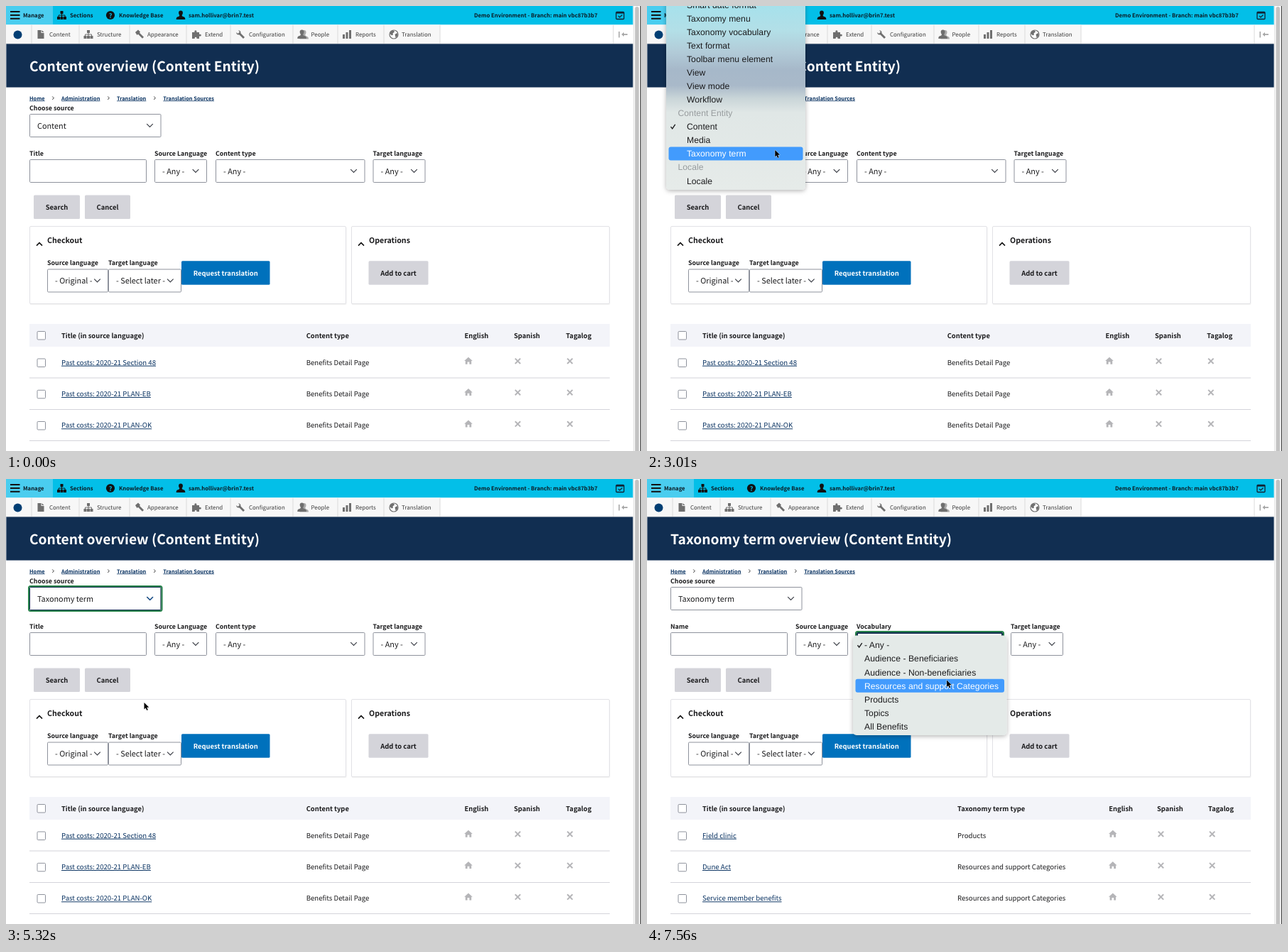
Write an HTML page that moves like this. It is 894 px wide and 627 px high and loops after 8000 ms.

```html
<!DOCTYPE html>
<html lang="en">
<head>
<meta charset="utf-8">
<title>Translation sources</title>
<style>
  html, body { margin: 0; width: 100%; height: 100%; overflow: hidden; background: #fff; }
  svg { display: block; width: 100%; height: 100%; }
  text { font-family: "Noto Sans CJK JP", "Noto Sans CJK SC", "Noto Sans CJK", "Open Sans", sans-serif;
         text-rendering: geometricPrecision; white-space: pre; text-decoration-thickness: 1px; }
  .menu text { font-family: "Liberation Sans", Arial, sans-serif; letter-spacing: .05px; }
</style>
</head>
<body>
<svg id="stage" viewBox="0 0 894 627" xmlns="http://www.w3.org/2000/svg"></svg>
<script>
const LOOP = 8000;
const NAVY = '#112e51', INK = '#1b1b1d', EDGE = '#8e929c', LINK = '#0a3362', GREY = '#d4d4da';

// ---- drawing helpers, each returns markup ----
const rect = (x, y, w, h, fill, more = '') =>
  `<rect x="${x}" y="${y}" width="${w}" height="${h}" fill="${fill}" ${more}/>`;
const path = (d, more) => `<path d="${d}" ${more}/>`;
const line = (d, color, w = 1) => path(d, `fill="none" stroke="${color}" stroke-width="${w}"`);
const solid = (d, color) => path(d, `fill="${color}"`);
const at = (x, y, s) => `<g transform="translate(${x} ${y})">${s}</g>`;
const text = (x, y, s, size, fill = INK, more = '') =>
  `<text x="${x}" y="${y}" font-size="${size}" fill="${fill}" ${more}>${s}</text>`;
const bold = (x, y, s, size, fill = INK, more = '') =>
  text(x, y, s, size, fill, 'font-weight="700" ' + more);
const link = (x, y, s, size, make = text) => make(x, y, s, size, LINK, 'text-decoration="underline"');
const label = (x, y, s) => bold(x, y, s, 8.83);
const chevron = (x, y, color = '#3c3f47') => line(`M${x - 4.3} ${y - 2.2}l4.3 4.3l4.3 -4.3`, color, 1.2);
const field = (x, y, w, h) => rect(x + .5, y + .5, w - 1, h - 1, '#fff', `rx="1.2" stroke="${EDGE}"`);
const select = (x, y, w, s, arrow) =>
  field(x, y, w, 33) + text(x + 11, y + 20.6, s, 10.85) + chevron(arrow || x + w - 16, y + 16.3);
const button = (x, y, w, s, fill = GREY, color = INK) =>
  rect(x, y, w, 33.5, fill, 'rx="1.5"') +
  bold(x + w / 2, y + 20.4, s, 9.42, color, 'text-anchor="middle"');
const group = (id, s, more = '') => `<g id="${id}" ${more}>${s}</g>`;

// ---- icons, centred on the origin ----
const tree = c => solid('M-2 -6h4v4h-4zM-6.5 2h4v4h-4zM-2 2h4v4h-4zM2.5 2h4v4h-4z', c) +
  line('M-4.5 2v-2h9v2M0 -2v4', c);
const person = c => solid('M0 -6.5c2.2 0 3.1 1.5 2.9 3.5c-.2 1.5 -.7 2.2 -1.2 2.9c0 1.4 1 1.8 2.6 2.4c1.5 .6 2 1.6 2 3.7h-12.6c0 -2.1 .5 -3.1 2 -3.7c1.6 -.6 2.6 -1 2.6 -2.4c-.5 -.7 -1 -1.4 -1.2 -2.9c-.2 -2 .7 -3.5 2.9 -3.5z', c);
const G = '#6f6f6f';
const icons = {
  page: solid('M-4.5 -6h5v4h4v8h-9z', G) + solid('M1.5 -6l3 3h-3z', G),
  tree: tree(G),
  tool: solid('M-6 -3l4 -3.5l3 3l-1 1.2l6 6l-2 2l-6 -6l-1.5 1.3z', G),
  puzzle: solid('M-6 -3h3.5c-1.2 -3.8 4 -3.8 2.8 0h3.7v3c3.8 -1.2 3.8 3.6 0 2.6v3.4h-3.6c.8 -3 -3.4 -3 -2.6 0h-3.8z', G),
  wrench: line('M-1.5 -1.5l6.5 6.5', G, 2.8) +
    path('M-4.8 -4.8a3 3 0 1 0 3.6 0v2.8h-3.6z', `fill="${G}" transform="rotate(-45 -3 -3)"`),
  people: at(1.6, .6, person('#aaa')) + at(-1.4, 0, person(G)),
  bars: solid('M-6.5 0h3v6h-3zM-2 -3h3v9h-3zM2.5 -6h3v12h-3z', G),
  globe: `<circle r="6" fill="#fff" stroke="${G}" stroke-width="1.2"/>` +
    solid('M-5.5 -1c1 -3.5 3 -4.5 5.5 -4.5l1 2l-2.5 2l.5 2l-2 1zM1.5 0l3 -2l1 2c0 2 -1.5 4 -3 4.5l-.5 -2.5z', G)
};

function header() {
  const tabs = [['Content', 49, 61, 'page'], ['Structure', 116, 128, 'tree'], ['Appearance', 188, 199, 'tool'],
    ['Extend', 268, 280, 'puzzle'], ['Configuration', 330, 342, 'wrench'], ['People', 418, 429.5, 'people'],
    ['Reports', 480.5, 492, 'bars'], ['Translation', 546, 557, 'globe']];
  const edges = [36, 103, 174, 254, 316, 404, 467, 532, 611, 855];
  const top = (x, s) => bold(x, 16.3, s, 7.72, '#0c1b24');
  return rect(0, 0, 882.6, 26.5, '#03bfe8') + rect(0, 0, 66, 26.5, '#4acdef') +
    [7, 11.9, 16.8].map(y => rect(6, y, 13.5, 2, '#111')).join('') +
    top(24, 'Manage') + at(78.5, 13, tree('#111')) + top(90, 'Sections') +
    '<circle cx="147" cy="13" r="6.1" fill="#111"/>' +
    bold(147, 16.5, '?', 9, '#03bfe8', 'text-anchor="middle"') + top(159, 'Knowledge Base') +
    at(246, 13, person('#111')) + top(257, 'sam.hollivar@brin7.test') +
    top(659, 'Demo Environment - Branch: main vbc87b3b7') +
    rect(859, 8.5, 11, 10, 'none', 'rx="1" stroke="#123" stroke-width="1.3"') +
    rect(859, 8, 11, 2.6, '#123') + line('M862 14l2 2l3.5 -3.5', '#123', 1.2) +
    rect(0, 26.5, 882.6, 27, '#fff') + rect(0, 26.5, 611, 27, '#f7f7f7') + rect(0, 52.6, 882.6, 1, '#ddd') +
    edges.map(x => rect(x - .5, 26.5, 1, 27, '#dcdcdc')).join('') +
    `<circle cx="16.5" cy="40.5" r="6" fill="#003e73"/>` +
    tabs.map(([s, ix, x, k]) => at(ix, 40, icons[k]) + text(x, 43.3, s, 7.93, '#3a3a3a')).join('') +
    rect(862.5, 36, 1.5, 8.5, '#a6a6a6') + solid('M866.5 40l3.5 -3v2.2h5v1.7h-5v2.2z', '#a6a6a6') +
    rect(.4, 53.4, 882.2, 61.2, NAVY);
}

function common() {
  const crumbs = [[33, 'Home'], [78, 'Administration'], [156, 'Translation'], [221.3, 'Translation Sources']];
  const panel = (x, w, title) =>
    rect(x + .5, 311.5, w, 109.5, '#000', 'rx="1.5" opacity=".05"') +
    rect(x + .5, 310.5, w - 1, 109, '#fff', 'rx="1.5" stroke="#e2e2e6"') +
    line(`M${x + 10} 337.6l4 -4l4 4`, '#111', 1.5) + bold(x + 25, 333.6, title, 10.62);
  return rect(883, 0, 11, 627, '#fafafa') + rect(883, 0, 1, 627, '#e4e4e4') +
    rect(885.5, 1, 5.5, 640, '#c3c3c3', 'rx="2.7"') + rect(892.8, 0, 1.2, 627, '#4a4a4a') +
    crumbs.map(([x, s]) => link(x, 132.5, s, 7.4, bold)).join('') +
    [66.5, 144.5, 209.5].map(x => line(`M${x - 1.2} 127.5l2 2.2l-2 2.2`, '#333')).join('') +
    label(33, 147, 'Choose source') + field(33, 152, 185.5, 33) + chevron(202.5, 168.3) +
    field(33, 216, 165, 33) + label(209, 211, 'Source Language') + select(209, 216, 74, '- Any -') +
    button(39, 266.5, 65, 'Search') + button(111, 266.5, 64, 'Cancel') +
    panel(33, 446, 'Checkout') + panel(486, 364, 'Operations') +
    label(58, 365.3, 'Source language') + label(144, 365.3, 'Target language') +
    select(58, 370.5, 86, '- Original -', 128.5) + select(144, 370.5, 103, '- Select later -', 231.3) +
    button(247, 359.3, 124.5, 'Request translation', '#0071bc', '#fff') +
    button(510.5, 359.3, 84, 'Add to cart') +
    rect(33, 448, 817, 32, '#f3f4f9') + bold(78, 467.8, 'Title (in source language)', 9.4) +
    [458.5, 497, 541.3, 585.5].map(y => rect(44, y, 11.5, 11.5, '#fff', `rx="1.2" stroke="${EDGE}"`)).join('') +
    [523.5, 568, 612].map(y => rect(33, y, 817, 1, GREY)).join('');
}

// The parts that differ between the two page loads
function page(p) {
  const house = x => solid(`M${x} -5.5l5.8 5.3h-1.6v4.7h-2.8v-3.4h-2.8v3.4h-2.8v-4.7h-1.6z`, '#b5b5b8');
  const cross = x => line(`M${x - 3.7} -3.7l7.4 7.4m0 -7.4l-7.4 7.4`, '#b5b5b8', 2);
  const head = (x, s) => bold(x, 467.8, s, 9.4);
  const [kind, en, es, tl] = p.cols;
  return bold(33, 92.1, p.title, 19.2, '#fff') +
    label(33, 211, p.name) + label(295, 211, p.filter) + select(295, 216, p.wide, '- Any -') +
    label(p.target, 211, 'Target language') + select(p.target, 216, 74, '- Any -') +
    head(kind, p.type) + head(en, 'English') + head(es, 'Spanish') + head(tl, 'Tagalog') +
    p.rows.map(([s, type], i) => at(0, 500.3 + i * 44.3,
      link(78, 5.4, s, 9.65) + text(kind, 5.4, type, 9.65) +
      house(en + 5.5) + cross(es + 5.5) + cross(tl + 5.7))).join('');
}

const benefit = 'Benefits Detail Page', support = 'Resources and support Categories';
const before = {
  title: 'Content overview (Content Entity)', name: 'Title', filter: 'Content type', wide: 210.5, target: 516.5,
  type: 'Content type', cols: [422.7, 645.5, 715, 788.2],
  rows: [['Past costs: 2020-21 Section 48', benefit], ['Past costs: 2020-21 PLAN-EB', benefit],
    ['Past costs: 2020-21 PLAN-OK', benefit]]
};
const after = {
  title: 'Taxonomy term overview (Content Entity)', name: 'Name', filter: 'Vocabulary', wide: 206, target: 512,
  type: 'Taxonomy term type', cols: [437, 650.3, 718, 790],
  rows: [['Field clinic', 'Products'], ['Dune Act', support], ['Service member benefits', support]]
};

// ---- popup menus; a leading # marks a group heading ----
const PITCH = 19.08;
const sourceMenu = {
  id: 'm1', x: 27, y: -20, w: 196, h: 279, first: -1.9, tx: 56, checked: 9, fill: 'url(#glass)',
  items: ['Smart date format', 'Taxonomy menu', 'Taxonomy vocabulary', 'Text format', 'Toolbar menu element',
    'View', 'View mode', 'Workflow', '#Content Entity', 'Content', 'Media', 'Taxonomy term', '#Locale', 'Locale']
};
const vocabMenu = {
  id: 'm2', x: 290, y: 220.5, w: 216.5, h: 140.5, first: 234, tx: 306, checked: 0, fill: '#e4eae8',
  items: ['- Any -', 'Audience - Beneficiaries', 'Audience - Non-beneficiaries', support, 'Products',
    'Topics', 'All Benefits']
};

function menu(m) {
  const rowY = i => m.first + i * PITCH;
  const tick = at(m.x + 9.5, rowY(m.checked), line('M-3 .3l2.2 2.8l4 -6', INK, 1.4));
  return group(m.id,
    rect(m.x, m.y, m.w, m.h, m.fill, 'rx="5" filter="url(#shade)"') +
    rect(m.x + 3.5, 0, m.w - 7, 19, '#429bfd', 'rx="3" class="hot"') + tick +
    m.items.map((s, i) => s[0] === '#'
      ? text(m.tx - 12.5, rowY(i) + 4.4, s.slice(1), 12.15, '#979c9e')
      : text(m.tx, rowY(i) + 4.4, s, 12.15, INK, `data-row="${i}"`)).join(''), 'class="menu"');
}

const hover = (id, x, y, w) => rect(x + 1, y + 1, w - 2, 31, 'none', `id="${id}" rx="1.2" stroke="${NAVY}" stroke-width="1.9"`);
const ring = (id, x, y, w) => group(id,
  rect(x + .5, y + .5, w - 1, 32, 'none', `rx="1" stroke="${NAVY}"`) +
  rect(x - 1, y - 1, w + 2, 35, 'none', 'rx="2.5" stroke="#26824a" stroke-width="2"') +
  chevron(x + w - 15.7, y + 16.3, '#0b4f96'));

const glass = [[0, '#9fe2ee'], [55, '#b3dfe7'], [85, '#b2cbd8'], [110, '#a6b8c9'], [132, '#a9b9c9'],
  [150, '#c9d5d8'], [170, '#e0e7e6'], [279, '#e6ebe9']];

document.getElementById('stage').innerHTML =
  `<defs><linearGradient id="glass" x2="0" y2="1">${glass.map(([y, c]) =>
    `<stop offset="${y / 279}" stop-color="${c}"/>`).join('')}</linearGradient>
  <filter id="shade" x="-10%" y="-10%" width="120%" height="125%">
    <feDropShadow dx="0" dy="1.5" stdDeviation="3.4" flood-color="#000" flood-opacity=".3"/></filter></defs>` +
  rect(0, 0, 894, 627, '#fff') + header() + common() +
  group('before', page(before)) + group('after', page(after)) + text(44, 172.6, 'Content', 10.85, INK, 'id="source"') +
  hover('h1', 33, 152, 185.5) + ring('r1', 33, 152, 185.5) +
  hover('h2', 295, 216, 206) + ring('r2', 295, 216, 206) +
  menu(sourceMenu) + menu(vocabMenu) +
  group('cursor', path('M0 0v9.4l2.2 -2l1.5 3.5l1.6 -.7l-1.5 -3.4h3z',
    'fill="#000" stroke="#fff" stroke-width=".8" stroke-linejoin="round" paint-order="stroke"'));

// ---- timing ----
const OPEN_1 = 2170, FADE = 3850, FADE_END = 4010, RELOAD = 5460, OPEN_2 = 6860;
const moves = [ // start, end, x, y
  [560, 1190, 147, 151], [1400, 1540, 173, 167], [2590, 3000, 180.3, 203],
  [4130, 4760, 194.5, 315], [6020, 6700, 347, 228.5], [7070, 7560, 422, 283.5]
];
const clamp = v => Math.max(0, Math.min(1, v));
const ease = k => k * k * (3 - 2 * k);

function pointer(t) {
  let x = 373, y = 511;
  for (const [a, b, tx, ty] of moves) {
    const k = ease(clamp((t - a) / (b - a)));
    x += (tx - x) * k;
    y += (ty - y) * k;
  }
  return { x, y };
}

const $ = id => document.getElementById(id);
const show = (id, on) => $(id).setAttribute('display', on ? 'inline' : 'none');
const inside = (p, x, y, w) => p.x >= x && p.x <= x + w && p.y >= y && p.y <= y + 33;

function updateMenu(m, open, opacity, p, lit) {
  show(m.id, open);
  if (!open) return;
  const g = $(m.id), row = Math.round((p.y - m.first) / PITCH), hot = g.querySelector('.hot');
  g.setAttribute('opacity', opacity);
  hot.setAttribute('y', m.first + row * PITCH - 9.5);
  hot.setAttribute('display', lit ? 'inline' : 'none');
  g.querySelectorAll('[data-row]').forEach(e =>
    e.setAttribute('fill', lit && +e.dataset.row === row ? '#fff' : INK));
}

function render(t) {
  const p = pointer(t), loaded = t >= RELOAD;
  const open1 = t >= OPEN_1 && t < FADE_END, open2 = t >= OPEN_2;
  show('before', !loaded);
  show('after', loaded);
  $('source').textContent = t < FADE_END ? 'Content' : 'Taxonomy term';
  // A select keeps its hover border while its menu is open
  show('h1', open1 || t >= 560 && t < OPEN_1 && inside(p, 33, 152, 185.5));
  show('r1', t >= OPEN_1 && !loaded);
  show('h2', open2 || loaded && inside(p, 295, 216, 206));
  show('r2', open2);
  const blink = t >= 3710 && t < 3780;
  updateMenu(sourceMenu, open1, 1 - clamp((t - FADE) / (FADE_END - FADE)), p, !blink);
  updateMenu(vocabMenu, open2, 1, p, true);
  show('cursor', t >= 560);
  $('cursor').setAttribute('transform', `translate(${p.x} ${p.y})`);
}

const start = performance.now();
function tick() {
  render((performance.now() - start) % LOOP);
  requestAnimationFrame(tick);
}
render(0);
requestAnimationFrame(tick);
</script>
</body>
</html>
```
